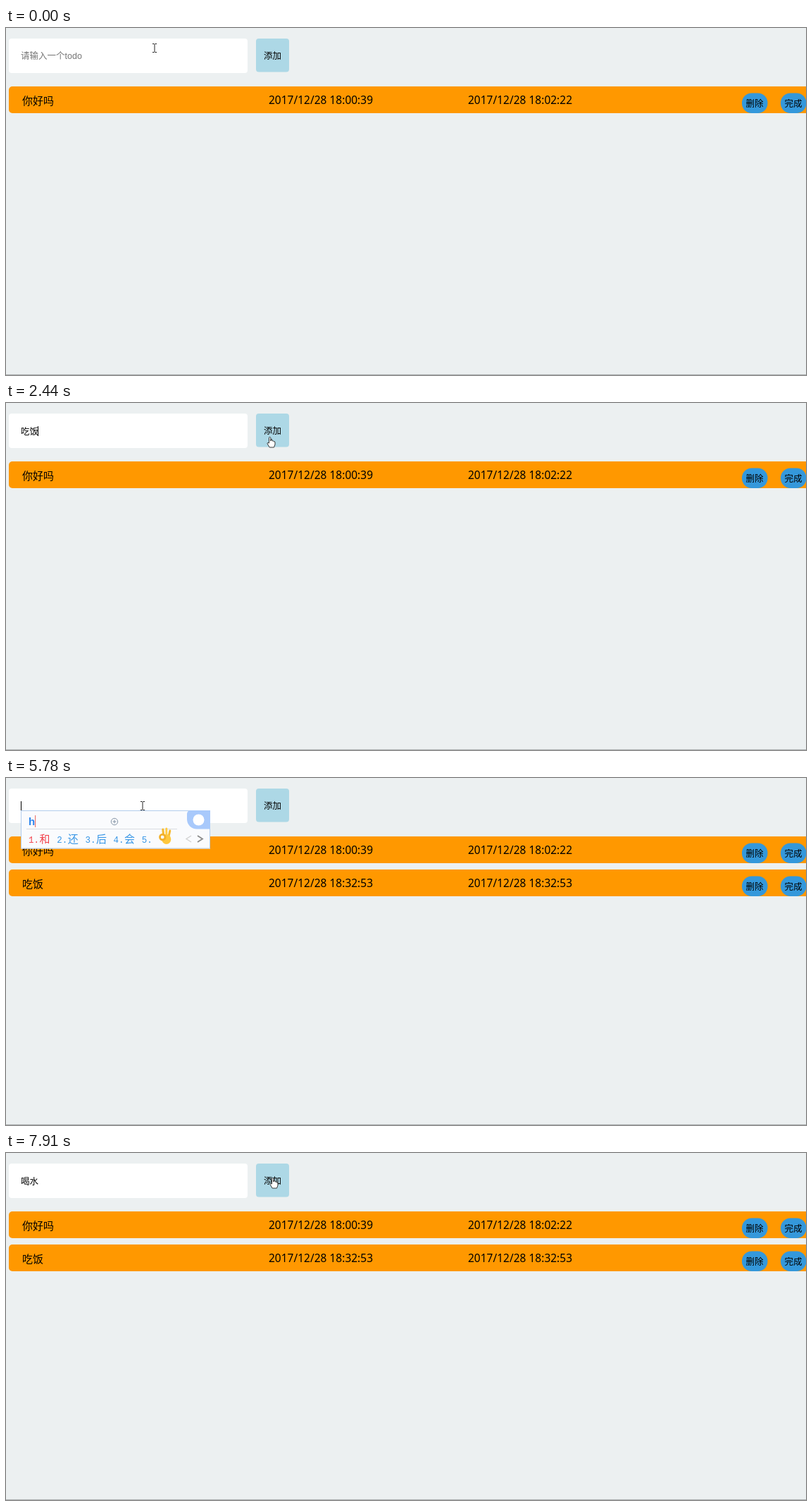
An HTML page with a canvas for the animation above (8000 ms loop, 1136x493 px).

```html
<!DOCTYPE html>
<html lang="zh">
<head>
<meta charset="utf-8">
<title>Todo</title>
<style>
  html, body { margin: 0; width: 100%; height: 100%; overflow: hidden; background: #ecf0f1; }
  canvas { display: block; }
</style>
</head>
<body>
<canvas id="stage" width="1136" height="493"></canvas>
<script>
const ctx = document.getElementById('stage').getContext('2d');
const LOOP = 8000;
const CJK = '"Noto Sans CJK SC", "Noto Sans CJK", sans-serif';
const UI = '12.5px "Liberation Sans", ' + CJK;

// Input field: [start, text, caret visible, composition letters, candidates]
const inputSteps = [
  [0, '', false],
  [400, '', true],
  [710, '', true, 'i', '吃 出 成 车 长'],
  [830, '', true, "ii'f", '吃饭 吃饭了吗 吃饭了 吃饭时间 吃饭去吧'],
  [950, '', true, "ii'fj", '吃饭 迟范 持饭 吃反 吃翻'],
  [1070, '吃饭', true],
  [1590, '吃饭', false],
  [2160, '吃饭', true],
  [2595, '吃饭', false],
  [4510, '吃饭', true],
  [4960, '吃饭', false],
  [5090, '吃', true],
  [5220, '', true],
  [5780, '', true, 'h', '和 还 后 会 *'],
  [5900, '', true, 'he', '和 喝 河 合 何'],
  [6040, '', true, "he'u", '喝水 和谁 河水 合适 *'],
  [6180, '', true, "he'uv", '喝水 和谁 河水 合水 和水'],
  [6340, '喝水', true],
  [6770, '喝水', false],
  [7360, '喝水', true],
  [7910, '喝水', false]
];

// Mouse pointer: [start, x, y, shape]
const pointerSteps = [
  [0, 211, 28, beam],
  [1870, 232, 24, beam],
  [2015, 290, 20, beam],
  [2160, 362, 30, hand],
  [2305, 375, 48, hand],
  [2450, 376, 56, hand],
  [3130, 382, 75, arrow],
  [3270, 396, 135, arrow],
  [3410, 402, 191, arrow],
  [3550, 392, 165, arrow],
  [3690, 365, 112, arrow],
  [3830, 295, 68, arrow],
  [3970, 225, 50, beam],
  [4110, 194, 42, beam],
  [4250, 194, 39, beam],
  [7080, 215, 37, beam],
  [7220, 300, 33, beam],
  [7360, 440, 30, arrow],
  [7500, 392, 36, hand],
  [7640, 379, 35, hand]
];

const rows = [
  [0, '你好吗', '2017/12/28 18:00:39', '2017/12/28 18:02:22'],
  [2740, '吃饭', '2017/12/28 18:32:53', '2017/12/28 18:32:53']
];

const stepAt = (steps, t) => steps.filter(s => s[0] <= t).pop();

function box(x, y, w, h, r, color) {
  ctx.fillStyle = color;
  ctx.beginPath();
  ctx.roundRect(x, y, w, h, r);
  ctx.fill();
}

function label(text, x, y, font, color = '#000') {
  ctx.font = font;
  ctx.fillStyle = color;
  ctx.fillText(text, x, y);
}

function line(points, color, width = 1) {
  ctx.strokeStyle = color;
  ctx.lineWidth = width;
  ctx.beginPath();
  points.forEach(([x, y]) => ctx.lineTo(x, y));
  ctx.stroke();
}

function dot(x, y, rx, ry, color) {
  ctx.fillStyle = color;
  ctx.beginPath();
  ctx.ellipse(x, y, rx, ry, 0, 0, Math.PI * 2);
  ctx.fill();
}

function ring(x, y, r, color, width) {
  ctx.strokeStyle = color;
  ctx.lineWidth = width;
  ctx.beginPath();
  ctx.arc(x, y, r, 0, Math.PI * 2);
  ctx.stroke();
}

function beam(x, y) {
  ctx.fillStyle = '#222';
  ctx.fillRect(x - 0.5, y - 5, 1, 11);
  for (const edge of [-6, 6]) {
    ctx.fillRect(x - 3, y + edge, 2.5, 1);
    ctx.fillRect(x + 0.5, y + edge, 2.5, 1);
  }
}

function outline(x, y, path) {
  ctx.save();
  ctx.translate(x, y);
  const shape = new Path2D(path);
  ctx.fillStyle = '#fff';
  ctx.fill(shape);
  ctx.strokeStyle = '#222';
  ctx.lineWidth = 0.9;
  ctx.stroke(shape);
  ctx.restore();
}

function hand(x, y) {
  outline(x, y, 'M-1.5 1.5Q-1.5 .4-.4 .4T.8 1.5V6Q2-.0 3.2 6Q4.6 5 5.2 6.8Q7 6 7 8V11L5.5 15H-.8L-4 9.5Q-4.2 7.6-1.5 9Z');
}

function arrow(x, y) {
  outline(x, y, 'M0 0V16L3.7 12.6 6.2 18.4 8.5 17.4 6 11.8H11Z');
}

function okHand(x, y) {
  ctx.lineCap = 'round';
  line([[x + 7, y + 13], [x + 6, y + 3]], '#f6b92f', 3);
  line([[x + 11, y + 12], [x + 11, y + 2]], '#ffcb45', 3);
  line([[x + 14, y + 14], [x + 16, y + 5]], '#f6b92f', 3);
  ctx.lineCap = 'butt';
  dot(x + 11, y + 17, 6.5, 7, '#ffc83d');
  ring(x + 5.5, y + 14, 3.8, '#f2b02c', 2.8);
  dot(x + 5.5, y + 14, 2.2, 2.2, '#fafbfd');
}

function candidateWindow(letters, candidates) {
  const items = candidates.split(' ');
  const itemWidth = item => 25.2 + (item === '*' ? 35 : item.length * 15);
  const end = items.reduce((sum, item) => sum + itemWidth(item), 32);
  const right = Math.round(end + 37);

  box(21, 46, right - 21, 54.5, 0, '#fafbfd');
  ctx.strokeStyle = '#b3cdec';
  ctx.lineWidth = 1;
  ctx.strokeRect(21.5, 46.5, right - 22, 53.5);
  box(right - 33, 46, 33, 26.5, [5, 0, 0, 14], '#a8c9fb');
  dot(right - 16.5, 59.5, 8, 8, '#fff');

  ctx.font = 'bold 15px "Liberation Sans", sans-serif';
  const caretX = 32.5 + ctx.measureText(letters).width;
  label(letters, 32, 67, ctx.font, '#2f86ee');
  line([[caretX, 53], [caretX, 70]], '#e8605a');
  if (letters.length === 1) {
    const plusX = 154;
    ring(plusX, 62, 4.7, '#8494a6', 1);
    line([[plusX - 2.5, 62], [plusX + 2.5, 62]], '#8494a6');
    line([[plusX, 59.5], [plusX, 64.5]], '#8494a6');
  }
  line([[29, 72.5], [right - 47, 72.5]], '#d9dde2');

  let x = 32;
  items.forEach((item, i) => {
    const color = i ? '#3796e6' : '#f2414b';
    label(i + 1 + '.', x, 92, '12.5px "Liberation Mono", monospace', color);
    if (item === '*') okHand(x + 24, 70);
    else label(item, x + 15.5, 92, '300 15px ' + CJK, color);
    x += itemWidth(item);
  });
  line([[right - 27, 82], [right - 34, 86.5], [right - 27, 91]], '#d2d2d2', 1.4);
  line([[right - 18, 82], [right - 11, 86.5], [right - 18, 91]], '#8c8c8c', 1.8);
}

function todoRow([, name, created, updated], y) {
  const dateFont = '15.5px "Noto Sans", sans-serif';
  box(4, y, 1150, 38, 5, '#ff9800');
  label(name, 23, y + 25.5, '15px ' + CJK);
  label(created, 373, y + 25, dateFont);
  label(updated, 656, y + 25, dateFont);
  [['删除', 1045], ['完成', 1100]].forEach(([text, x]) => {
    box(x, y + 9.5, 36.5, 28.5, 14, '#3498db');
    label(text, x + 5.5, y + 28.5, UI);
  });
}

function draw(t) {
  const [, text, caret, letters, candidates] = stepAt(inputSteps, t);
  const [, x, y, shape] = stepAt(pointerSteps, t);

  box(0, 0, 1136, 493, 0, '#ecf0f1');
  box(0, 492, 1136, 1, 0, '#aeb1b2');
  box(4, 15, 339, 49, 4, '#fff');
  box(355, 15, 47, 47.5, 4, '#add8e6');
  label('添加', 366, 44, UI);
  rows.filter(row => row[0] <= t).forEach((row, i) => todoRow(row, 83 + i * 47));

  if (text) label(text, 21, 45, UI);
  else if (!letters) label('请输入一个todo', 21, 43.5, UI, '#757575');
  if (caret) box(21 + Math.floor(text.length * 12.4), 33, 1, 14, 0, '#000');
  if (letters) candidateWindow(letters, candidates);
  shape(x, y);
}

const start = performance.now();
function tick() {
  draw((performance.now() - start) % LOOP);
  requestAnimationFrame(tick);
}
tick();
</script>
</body>
</html>
```
